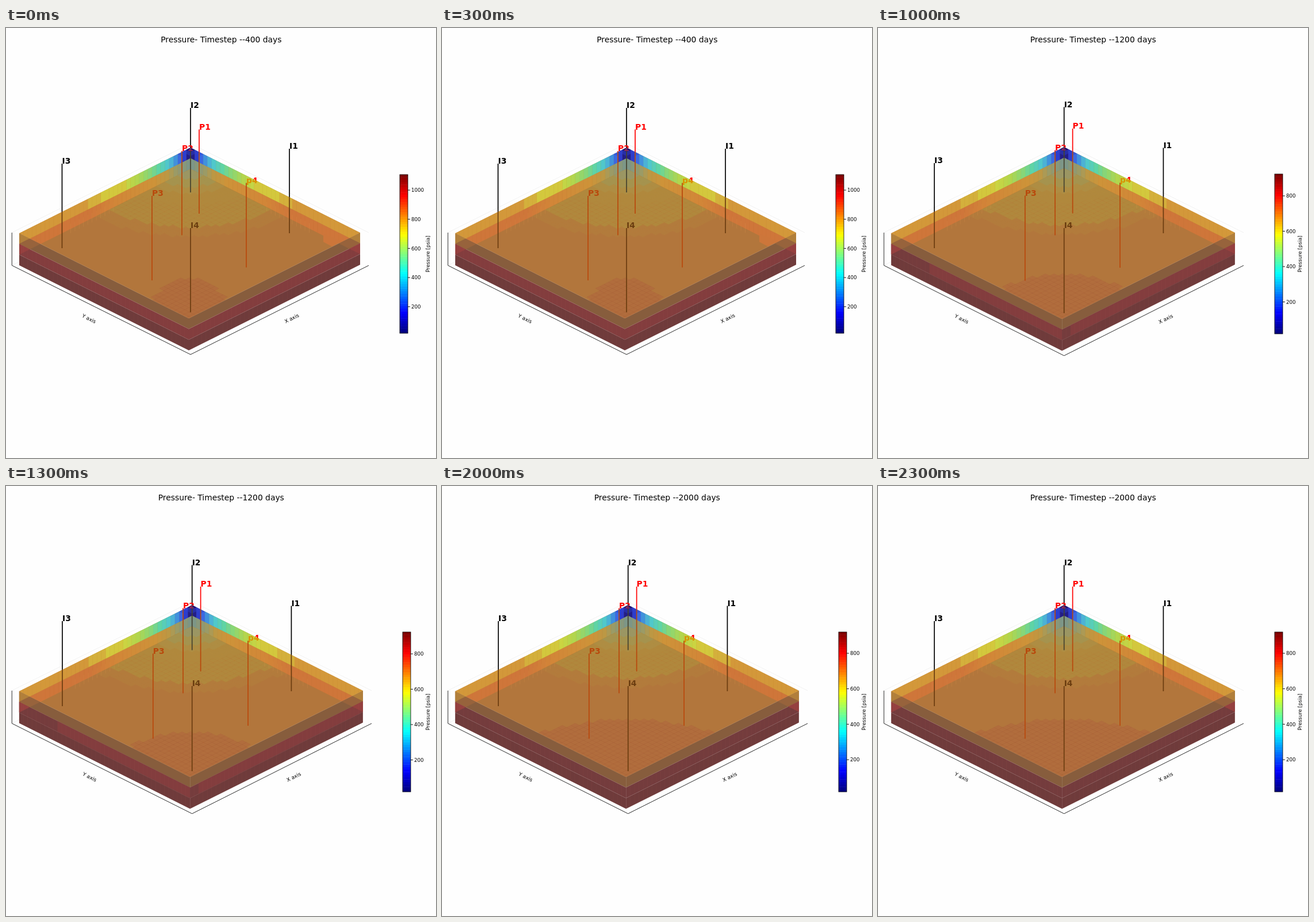
These frames come from a looping animation (748 px wide and 748 px high, 2.5 s). An HTML page:

```html
<!DOCTYPE html>
<html lang="en">
<head>
<meta charset="utf-8">
<title>Pressure</title>
<style>
html, body { margin: 0; width: 100%; height: 100%; overflow: hidden; background: #fefefe; }
svg { display: block; width: 100vw; height: 100vh; font-family: "DejaVu Sans", sans-serif; }
</style>
</head>
<body>
<svg id="stage" viewBox="0 0 748 748"></svg>
<script>
const STEP = 500, N = 40;
const stage = document.getElementById('stage');

// Box geometry and colour bar place for the first view and for the later ones
const narrow = { cx: 321, top: 208, ax: 7.375, bx: 7.45, ay: 3.7, by: 3.725, h: 18.6,
  low: 568, right: 631, bar: [685, 255, 276], xl: [497, 505], yl: [144.5, 505.5],
  wells: [['I2', 321, 139, 286], ['P1', 336, 176.5, 323], ['P2', 306, 214, 360.5], ['I1', 493, 210, 357],
    ['I3', 97.5, 236, 383], ['P3', 254, 292, 439], ['p4', 418, 269.5, 416.5], ['I4', 321, 348, 494.5]] };
const wide = { cx: 323.7, top: 207, ax: 7.43, bx: 7.52, ay: 3.725, by: 3.75, h: 18.5,
  low: 570, right: 636, bar: [690, 254, 278], xl: [500.5, 506], yl: [145.5, 506],
  wells: [['I2', 323.7, 137.5, 285.5], ['P1', 338.6, 175, 322.5], ['P2', 308, 212.5, 360.5], ['I1', 496.4, 208.5, 357],
    ['I3', 98, 235, 383], ['P3', 255.8, 291.5, 439.5], ['p4', 421, 269.3, 417], ['I4', 323.7, 348, 496]] };

// bands: colour steps on the back walls; disc: radius of the low-pressure zone;
// patch: half axes of the front zone; light: lighter stretches of the middle layer
const states = [
  { g: narrow, bands: [15, 21, 24], disc: 19.2, patch: [10.5, 23.6], light: [[0, 40], [0, 40]], ticks: [1000, 282, 200, 50.7], notch: true },
  { g: wide, bands: [17, 21, 25], disc: 19.6, patch: [7.8, 23.4], light: [[4, 40], [0, 40]], ticks: [900, 256, 100, 31.3] },
  { g: wide, bands: [16, 20, 24], disc: 18.6, patch: [20.5, 26], light: [[9, 40], [0, 38]], ticks: [800, 292, 200, 61.5] },
  { g: wide, bands: [15, 20, 25], disc: 17.6, patch: [28.7, 30], light: [null, [17, 31.3]], ticks: [800, 292.7, 200, 61.3] },
  { g: wide, bands: [15.5, 20, 24], disc: 17, patch: [34, 31.5], light: [null, null], ticks: [800, 291, 200, 61.7] }
];

const cold = [[0, 35, 30, 135], [1, 45, 60, 205], [2, 60, 105, 225], [3, 65, 145, 220], [4, 75, 178, 214], [5, 80, 200, 203],
  [7, 95, 212, 165], [9, 135, 214, 120], [12, 178, 214, 78], [15, 203, 212, 66]];
const warm = [[0, 125, 150, 135], [3, 155, 155, 102], [5, 188, 152, 68], [8, 206, 147, 57], [17, 210, 134, 56], [23, 207, 118, 58]];

const rgb = c => `rgb(${c.map(Math.round)})`;
const poly = (pts, fill, more = '') =>
  `<polygon points="${pts.map(p => p.map(n => n.toFixed(2))).join(' ')}" fill="${fill}" ${more}/>`;
const line = (x1, y1, x2, y2, color, w = 1) =>
  `<path d="M${x1} ${y1}L${x2} ${y2}" stroke="${color}" stroke-width="${w}"/>`;
const text = (s, x, y, size, more = '') => `<text x="${x}" y="${y}" font-size="${size}" ${more}>${s}</text>`;

function ramp(stops, k) {
  const n = stops.findIndex(s => s[0] >= k);
  if (n < 0) return stops[stops.length - 1].slice(1);
  if (n === 0) return stops[0].slice(1);
  const a = stops[n - 1], b = stops[n], f = (k - a[0]) / (b[0] - a[0]);
  return [1, 2, 3].map(c => a[c] + (b[c] - a[c]) * f);
}

function jet(v) {
  return [3, 2, 1].map(c => 255 * Math.max(0, Math.min(1, 1.5 - Math.abs(4 * v - c))));
}

function volume(s) {
  const g = s.g, h = g.h;
  const at = (i, j, d = 0) => [g.cx + i * g.ax - j * g.bx, g.top + i * g.ay + j * g.by + d];
  const diamond = d => [at(0, 0, d), at(N, 0, d), at(N, N, d), at(0, N, d)];
  const left = (a, b, d0, d1) => [at(a, N, d0), at(b, N, d0), at(b, N, d1), at(a, N, d1)];
  const right = (a, b, d0, d1) => [at(N, a, d0), at(N, b, d0), at(N, b, d1), at(N, a, d1)];
  const clip = (id, d) => `<clipPath id="${id}">${poly(diamond(d), '#000')}</clipPath>`;

  function cells(test, d, fill, stroke = fill) {
    let path = '';
    for (let i = 0; i < N; i++) for (let j = 0; j < N; j++) {
      if (!test(i + .5, j + .5)) continue;
      const q = [at(i, j, d), at(i + 1, j, d), at(i + 1, j + 1, d), at(i, j + 1, d)];
      path += 'M' + q.map(p => p.map(n => n.toFixed(1)).join(' ')).join('L') + 'Z';
    }
    return `<path d="${path}" fill="${fill}" stroke="${stroke}" stroke-width=".5"/>`;
  }

  function walls(color, d) {
    let out = '';
    for (let k = 0; k < N; k++) {
      const fill = rgb(color(k));
      const edge = `stroke="${fill}" stroke-width=".4"`;
      out += poly([at(k, 0, d), at(k + 1, 0, d), at(k + 1, 0, d + h), at(k, 0, d + h)], fill, edge);
      out += poly([at(0, k, d), at(0, k + 1, d), at(0, k + 1, d + h), at(0, k, d + h)], fill, edge);
    }
    return out;
  }

  const [b1, b2, b3] = s.bands;
  const upper = k => k < b1 ? ramp(cold, k) : k < b2 ? [211, 200, 61] : k < b3 ? [212, 176, 60] : [211, 152, 58];
  const within = r => (i, j) => Math.hypot(i, j) < r;

  let out = `<defs>${clip('lid', 0)}${clip('mid', h)}${clip('deep', 2 * h)}</defs>`;

  // Front faces
  const mid = '#833d3e', dark = '#6f3b3b';
  [left, right].forEach((face, n) => {
    out += poly(face(0, N, 0, h), '#875d3d');
    out += poly(face(0, N, h, 2 * h), s.light[n] ? mid : '#743c3d');
    const span = s.light[n];
    if (span && (span[0] > 0 || span[1] < N)) {
      out += poly(face(0, N, h, 2 * h), '#753c3d') + poly(face(span[0], span[1], h, 2 * h), mid);
    }
    out += poly(face(0, N, 2 * h, 3 * h), dark);
    // Back walls seen through the outer corners
    const tip = face(0, h / 2 / g.ay, 0, h);
    const a = tip[0], b = tip[3], c = [tip[1][0], (a[1] + b[1]) / 2];
    const dx = c[0] - a[0];
    const low = [a[0], a[1] + 2 * h], in2 = [c[0], c[1] + h], in1 = [a[0] + 2 * dx, a[1] + h];
    out += poly([a, b, c], '#b17f3b');
    out += poly([b, c, in1, in2], '#97633c');
    out += poly([b, low, in2], '#95403f');
  });
  for (let k = 1; k < N; k++) {
    for (const p of [at(k, N), at(N, k)]) {
      out += line(p[0], p[1] + h, p[0], p[1] + 3 * h, 'rgba(220,120,110,.07)', .8);
    }
  }

  // Inside, seen through the lid
  const [pa, pb] = s.patch;
  const inPatch = (i, j) => ((i - j) / pa) ** 2 + ((2 * N - i - j) / pb) ** 2 < 1;
  const ring = (i, j) => Math.hypot(i, j) > s.disc - 7 && Math.hypot(i, j) < s.disc;
  out += '<g clip-path="url(#lid)">';
  out += poly(diamond(0), '#b3773c');
  out += walls(upper, 0);
  out += cells((i, j) => i < 1 && j < 1, 0, 'rgba(28,15,105,.85)', 'none');
  out += cells((i, j) => i + j > 1.5 && i + j < 3.5, 0, 'rgba(45,65,205,.45)', 'none');
  out += '<g clip-path="url(#mid)">' + walls(k => ramp(warm, k), h);
  out += '<g clip-path="url(#deep)">' + poly(diamond(2 * h), '#b2763c');
  out += cells(within(s.disc + 3), 2 * h, '#b27b3c');
  out += cells(within(s.disc), 2 * h, '#b0883d');
  out += cells(ring, 2 * h, 'none', 'rgba(180,120,60,.35)');
  out += cells(within(8), 2 * h, '#ae8d43');
  out += cells(within(6), 2 * h, '#a5934e');
  out += cells(within(3), 2 * h, '#9b9663');
  out += '</g></g>';
  for (let k = s.bands[1] - 3; k < s.bands[1] + 8; k++) {
    for (const p of [at(k, 0), at(0, k)]) {
      out += line(p[0], p[1] + 1.5 * h, p[0], p[1] + 2.4 * h, 'rgba(225,150,80,.3)', .8);
    }
  }
  out += cells(inPatch, h, '#b16d3d', 'rgba(165,98,58,.4)');
  if (s.notch) out += poly([[552, 358], [552, 372], [567, 380], [585, 371]], '#cd763a');
  return out + '</g>';
}

function wells(list) {
  const draw = pick => list.map(([name, x, y, end]) => {
    const [ink, label] = pick(name);
    return line(x, y, x, end, ink, 1.7) + text(name, x, y, 13.85, `font-weight="bold" fill="${label}"`);
  }).join('');
  const isRed = name => /^p/i.test(name);
  const open = name => isRed(name) ? ['#f00', '#f00'] : ['#000', '#000'];
  const veiled = name => {
    const ink = isRed(name) ? '#b9480c' : name === 'I2' ? '#45422f' : '#6b3d10';
    return [ink, { p4: '#da9000', P2: '#8a2a60' }[name] || ink];
  };
  return [draw(open), `<g clip-path="url(#lid)">${draw(veiled)}</g>`];
}

function colorBar(s) {
  const [x, y, len] = s.g.bar, parts = 64, [first, ty, step, gap] = s.ticks;
  let out = '';
  for (let n = 0; n < parts; n++) {
    const top = y + len * (1 - (n + 1) / parts);
    out += `<rect x="${x}" y="${top}" width="14" height="${len / parts + (n ? .5 : 0)}" fill="${rgb(jet(n / (parts - 1)))}"/>`;
  }
  out += `<rect x="${x}" y="${y}" width="14" height="${len}" fill="none" stroke="#000" stroke-width=".8"/>`;
  for (let v = first, ny = ty; v > 0; v -= step, ny += gap) {
    out += line(x + 14, ny, x + 18, ny, '#000', .9) + text(v, x + 20, ny + 3.2, 8.65);
  }
  return out + text('Pressure [psia]', 0, 0, 8.65, 'text-anchor="middle" transform="translate(736.5 393) rotate(-90)"');
}

function axes(g) {
  const name = (s, [x, y], turn) =>
    text(s, 0, 3.2, 8.9, `text-anchor="middle" transform="translate(${x} ${y}) rotate(${turn})"`);
  return `<path d="M10.3 356V413L${g.cx} ${g.low}L${g.right} 413" fill="none" stroke="#222" stroke-width=".95"/>`
    + name('X axis', g.xl, -26.6) + name('Y axis', g.yl, 26.6);
}

function picture(s, n) {
  const g = s.g, [open, veiled] = wells(g.wells);
  return `<rect width="748" height="748" fill="#fefefe"/>`
    + `<path d="M10 356L${g.cx} 201L${g.right} 356M10 413L40 398" fill="none" stroke="#efefef" stroke-width=".8"/>`
    + open + volume(s) + veiled + axes(g) + colorBar(s)
    + text(`Pressure- Timestep --${400 * (n + 1)} days`, 374.3, 25, 13.85, 'text-anchor="middle"');
}

const pictures = states.map(picture);
let shown = -1;

function update(t) {
  const n = Math.floor(t / STEP) % states.length;
  if (n !== shown) stage.innerHTML = pictures[shown = n];
}

const start = performance.now();
function tick() {
  update(performance.now() - start);
  requestAnimationFrame(tick);
}
tick();
</script>
</body>
</html>
```
